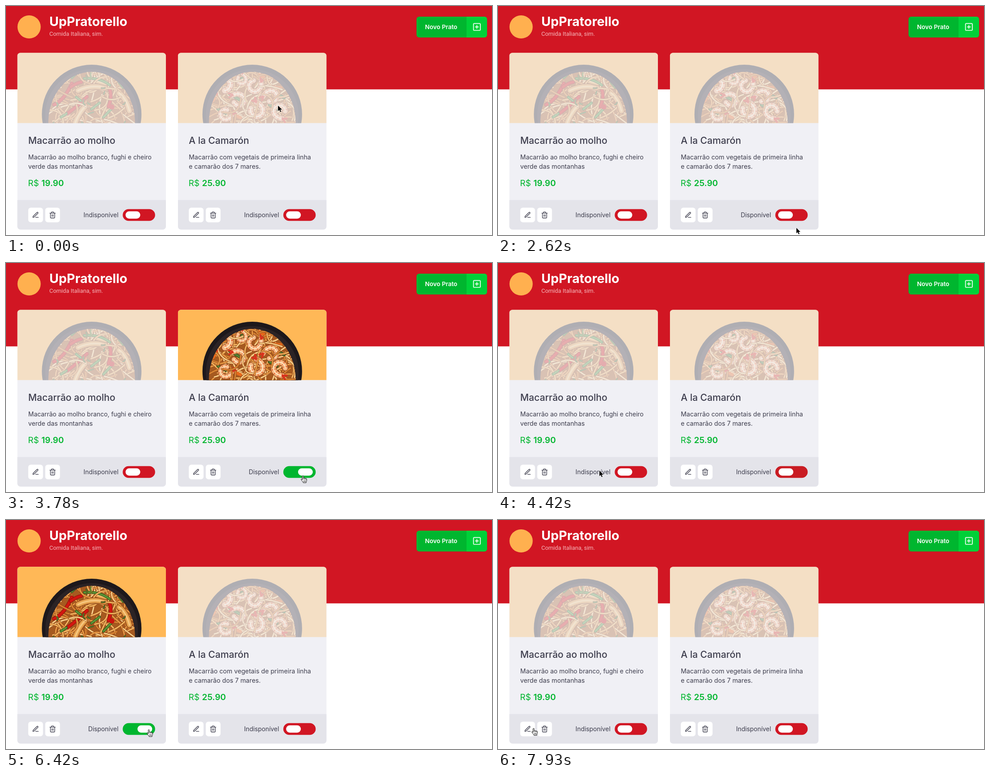
Write an HTML page that moves like this. It is 1088 px wide and 515 px high and loops after 8000 ms.

```html
<!DOCTYPE html>
<html lang="pt-BR">
<head>
<meta charset="utf-8">
<title>UpPratorello</title>
<style>
  html, body { margin: 0; width: 100%; height: 100%; overflow: hidden; background: #fff; }
  svg { display: block; width: 100vw; height: 100vh; }
  text { font-family: Inter, sans-serif; fill: #3d3d4d; white-space: pre; }
  .line { fill: none; stroke-linecap: round; stroke-linejoin: round; }
</style>
</head>
<body>
<svg id="stage" viewBox="0 0 1088 515"></svg>
<script>
const LOOP = 8000;
const stage = document.getElementById('stage');
const $ = id => document.getElementById(id);

const rect = (x, y, w, h, r, fill, extra = '') =>
  `<rect x="${x}" y="${y}" width="${w}" height="${h}" rx="${r}" fill="${fill}" ${extra}/>`;
const text = (x, y, size, weight, str, extra = '') =>
  `<text x="${x}" y="${y}" font-size="${size}" font-weight="${weight}" ${extra}>${str}</text>`;
const line = (d, color, width, extra = '') =>
  `<path class="line" d="${d}" stroke="${color}" stroke-width="${width}" ${extra}/>`;

function random(seed) {
  return () => (seed = (seed * 16807) % 2147483647) / 2147483647;
}

// Tangle of curved strands scattered over the bowl
function strands(rnd, count, colors, length, width) {
  let out = '';
  for (let i = 0; i < count; i++) {
    const x = 70 + rnd() * 193, y = 145 + rnd() * 122, a = rnd() * 6.28;
    const len = length * (0.6 + rnd() * 0.8), bend = (rnd() - 0.5) * len * 1.3;
    const dx = Math.cos(a) * len / 2, dy = Math.sin(a) * len / 2;
    const cx = x - Math.sin(a) * bend, cy = y + Math.cos(a) * bend;
    const d = `M${(x - dx).toFixed(1)} ${(y - dy).toFixed(1)}Q${cx.toFixed(1)} ${cy.toFixed(1)} ${(x + dx).toFixed(1)} ${(y + dy).toFixed(1)}`;
    const color = colors[Math.floor(rnd() * colors.length)];
    out += line(d, '#8a3f12', width + 1.4) + line(d, color, width);
  }
  return out;
}

const noodles = ['#f2b45f', '#e89a45', '#f8cd86', '#d98433'];

function chickenDish() {
  const rnd = random(4127);
  const red = d => line(d, '#8d0f0c', 8) + line(d, '#d3170f', 6);
  const green = d => line(d, '#2c5a1b', 6) + line(d, '#5d9636', 3.5);
  const meat = d => line(d, '#8f4817', 14) + line(d, '#e5a04c', 11) + line(d, '#f6c57c', 4);
  return strands(rnd, 105, noodles, 48, 3.2) +
    red('M82 222Q105 212 122 174') + red('M112 242Q132 228 156 204') +
    red('M207 188Q213 205 204 226') + red('M120 182Q134 172 143 171') +
    meat('M136 190Q166 176 196 184') + meat('M228 196Q244 208 251 236') +
    meat('M130 262Q138 240 152 226') + meat('M178 168L198 173') +
    green('M150 163Q184 160 207 178') + green('M122 161L132 152') + green('M166 232L184 218') +
    green('M193 250L210 232') + green('M98 250L110 242') + green('M228 172L237 183') + green('M142 213L132 205') +
    strands(rnd, 16, noodles, 36, 3) +
    '<circle cx="211.500" cy="227" r="6" fill="#c9150e"/>' +
    strands(rnd, 16, ['#5d9636', '#3f7629'], 9, 2.4);
}

function shrimpDish() {
  const rnd = random(991);
  const shrimp = (x, y, s, turn) => {
    const d = 'M-11 10C-16-6-4-17 6-12S15 6 5 10';
    return `<g transform="translate(${x} ${y}) rotate(${turn}) scale(${s})">` +
      line(d, '#93401c', 12) + line(d, '#f6b780', 10) +
      line(d, '#e2622c', 9, 'stroke-dasharray="1.500 6" style="stroke-linecap:butt"') +
      line(d, '#fde0bd', 2.5) + line('M-11 10L-16 17M-11 10L-8 18', '#d8321c', 4) + '</g>';
  };
  const green = d => line(d, '#29451a', 7) + line(d, '#587f30', 4.5);
  const carrot = d => line(d, '#e8691b', 7);
  return strands(rnd, 120, noodles, 44, 3.2) +
    green('M117 199L142 213') + green('M143 163L166 171') + green('M205 222L222 232') + green('M90 232L107 241') +
    green('M220 198L238 206') +
    carrot('M210 182L230 184') + carrot('M183 155L198 164') + carrot('M124 244L140 251') + carrot('M78 213L86 202') +
    shrimp(101, 177, 1.25, 10) + shrimp(135, 210, 1.05, 80) + shrimp(173, 179, 1.05, 190) +
    shrimp(207, 203, 1.05, 40) + shrimp(176, 233, 1.15, 130) + shrimp(228, 238, 1.1, 290) +
    shrimp(108, 244, 0.95, 220) + shrimp(143, 164, 0.8, 140) +
    strands(rnd, 22, noodles, 40, 3);
}

function photo(k, dish) {
  return `<g id="photo${k}" clip-path="url(#top)">` + rect(0, 105, 333, 158.5, 0, '#ffb857') +
    '<circle cx="166.500" cy="243.500" r="111.500" fill="#1d181b"/>' +
    '<circle cx="166.500" cy="246" r="104" fill="#2b2325"/>' +
    `<g clip-path="url(#food)">${rect(60, 140, 220, 130, 0, '#a65a20')}${dish}</g></g>`;
}

const icon = (x, y, d, color, scale = 0.68) =>
  `<g transform="translate(${x} ${y}) scale(${scale})">${line(d, color, 2)}</g>`;
const PEN = 'M12 20h9M16.500 3.500a2.120 2.120 0 0 1 3 3L7 19l-4 1 1-4z';
const BIN = 'M3 6h18M19 6v14a2 2 0 0 1-2 2H7a2 2 0 0 1-2-2V6m3 0V4a2 2 0 0 1 2-2h4a2 2 0 0 1 2 2v2M10 11v6M14 11v6';
const PLUS = 'M5 3h14a2 2 0 0 1 2 2v14a2 2 0 0 1-2 2H5a2 2 0 0 1-2-2V5a2 2 0 0 1 2-2zM12 8v8M8 12h8';

function card(k, x, dish, title, rows, price) {
  const green = 'style="fill:#00b62f"';
  return `<g transform="translate(${x} 0)"><g clip-path="url(#card)">` +
    rect(0, 105, 333, 398, 0, '#f0f0f5') + photo(k, dish) + rect(0, 436.5, 333, 67, 0, '#e4e4ea') + '</g>' +
    text(24.5, 309.5, 21.1, 500, title) +
    text(24.5, 345.3, rows[0][0], 400, rows[0][1]) + text(24.5, 365.5, 14.2, 400, rows[1]) +
    text(24, 405, 19, 400, 'R$', green) + text(54, 405, 19, 600, price, green) +
    rect(24.5, 453.5, 33, 33, 6, '#fff') + icon(32.8, 461.8, PEN, '#3d3d4d') +
    rect(62.5, 453.5, 33, 33, 6, '#fff') + icon(70.8, 461.8, BIN, '#3d3d4d') +
    text(226.5, 475.2, 13.85, 400, '', `id="label${k}" text-anchor="end"`) +
    rect(236, 456.8, 72.5, 26.4, 13.2, '#d11623', `id="track${k}"`) +
    rect(242.3, 461.8, 33, 16.4, 8.2, '#fff', `id="knob${k}"`) + '</g>';
}

stage.innerHTML = `<defs>
  <clipPath id="card">${rect(0, 105.3, 332.7, 397.4, 7, '#000')}</clipPath>
  <clipPath id="top">${rect(0, 105, 333, 158.5, 0, '#000')}</clipPath>
  <clipPath id="food"><ellipse cx="166.500" cy="262" rx="97" ry="114"/></clipPath></defs>` +
  rect(0, 0, 1088, 515, 0, '#fff') + rect(0, 0, 1088, 187.5, 0, '#d11623') +
  '<circle cx="51.700" cy="47" r="26" fill="#ffb04f"/>' +
  text(97, 44.8, 28.7, 700, 'UpPratorello', 'style="fill:#fff"') +
  text(97, 67.3, 12.9, 400, 'Comida Italiana, sim.', 'style="fill:#f6b9bd;font-family:Roboto,sans-serif"') +
  rect(919, 24, 158, 46.8, 6, '#00b62f') +
  '<path d="M1031 24h40a6 6 0 0 1 6 6v34.800a6 6 0 0 1-6 6h-40z" fill="#00d038"/>' +
  text(938, 52.2, 13.55, 600, 'Novo Prato', 'style="fill:#fff"') +
  icon(1044, 36.9, PLUS, '#fff', 0.85) +
  card(0, 25.3, chickenDish(), 'Macarrão ao molho',
    [[13.93, 'Macarrão ao molho branco, fughi e cheiro'], 'verde das montanhas'], '19.90') +
  card(1, 384.8, shrimpDish(), 'A la Camarón',
    [[14.2, 'Macarrão com vegetais de primeira linha'], 'e camarão dos 7 mares.'], '25.90') +
  `<g id="cursor">
    <path id="arrow" d="M0 0V12.300L2.900 9.600 4.900 14.300 7 13.400 5 8.900H8.900Z" fill="#000" stroke="#fff" stroke-width=".8" paint-order="stroke"/>
    <g id="hand"><path d="M3.400 9.500V1.800a1.300 1.300 0 0 1 2.600 0V6.200c.2-1 2.300-1 2.500.3.400-.8 2.200-.7 2.400.5.400-.6 2.200-.5 2.200 1v3.200c0 1.600-1 2.400-1.200 4.900H5.400C5 13.900 2.200 11.600.8 9.200c-.8-1.400 1-2.200 2.600.3z" fill="#fff" stroke="#000" stroke-linejoin="round"/>
    ${line('M6 6.200V9M8.500 6.500V9M10.900 7V9.200M6.600 11.500V14M8.600 11.500V14M10.400 11.500V14', '#000', 0.8)}</g>
  </g>`;

// [time, x, y, is hand]
const pointer = [
  [0, 609, 224], [20, 633, 256], [890, 642, 468, 1], [2620, 668, 499], [3380, 666.5, 495],
  [3580, 661, 474, 1], [3780, 660, 478, 1], [4130, 610, 497], [4420, 227, 467],
  [4640, 141, 468], [4840, 94, 467, 1], [5040, 155, 479], [5270, 210, 478],
  [5490, 315, 471, 1], [7730, 137, 469], [7930, 75, 468, 1]
];
// [time, available, photo strength, switch position]
const dishes = [
  [[0, 0, 0, 0], [6090, 1, 0.5, 0.4], [6420, 1, 1, 1], [7180, 1, 1, 0.85], [7420, 0, 0, 0.04], [7730, 0, 0, 0]],
  [[0, 0, 0, 0], [2620, 1, 0, 0], [2890, 1, 1, 0.97], [3180, 1, 1, 1], [4130, 0, 0.5, 0.5], [4420, 0, 0, 0.04], [4640, 0, 0, 0]]
];

const at = (track, t) => track.filter(step => step[0] <= t).pop();
const mix = (a, b, p) => a + (b - a) * p;
const bezier = (p, a, b, c, d) => {
  const q = 1 - p;
  return q * q * q * a + 3 * q * q * p * b + 3 * q * p * p * c + p * p * p * d;
};

function draw(t) {
  let [, x, y, hand] = at(pointer, t);
  if (t >= 400 && t < 890) {
    const p = (Math.floor((t - 400) / 490 * 18) + 1) / 19;
    x = bezier(p, 633, 740, 740, 645);
    y = bezier(p, 256, 320, 575, 468);
  }
  $('cursor').setAttribute('transform', `translate(${x} ${y})`);
  $('arrow').style.display = hand ? 'none' : '';
  $('hand').style.display = hand ? '' : 'none';

  dishes.forEach((track, k) => {
    const [, on, strength, pos] = at(track, t);
    $('label' + k).textContent = on ? 'Disponível' : 'Indisponível';
    $('photo' + k).setAttribute('opacity', mix(0.3, 1, strength));
    $('track' + k).setAttribute('fill', `rgb(${mix(209, 0, pos)},${mix(22, 182, pos)},${mix(35, 47, pos)})`);
    $('knob' + k).setAttribute('x', mix(242.3, 269, pos));
  });
}

function tick(now) {
  draw(now % LOOP);
  requestAnimationFrame(tick);
}
draw(0);
requestAnimationFrame(tick);
</script>
</body>
</html>
```
